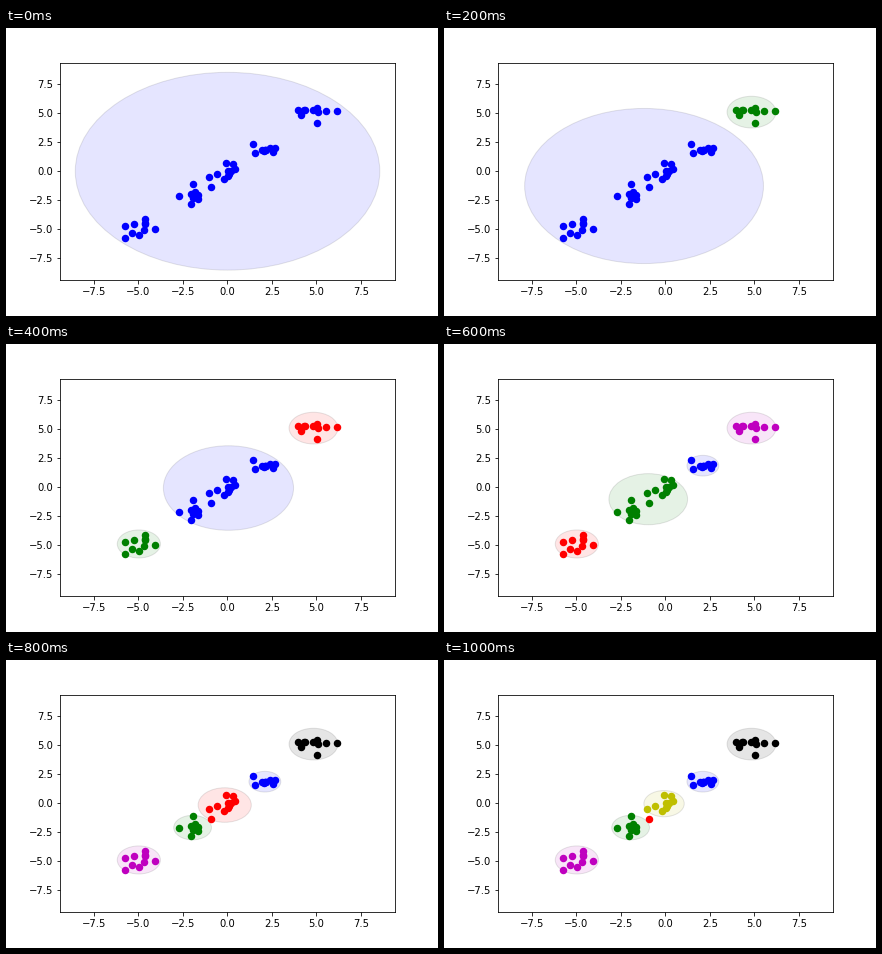
A matplotlib script for the animation above (1200 ms loop, 432 by 288 pixels).

```python
import matplotlib.pyplot as plt
import numpy as np
from matplotlib.animation import FuncAnimation
from matplotlib.patches import Circle

plt.rcParams.update({"font.family": "DejaVu Sans", "font.size": 10})
rng = np.random.default_rng(1)


def make_group(size, center, *rim):
    """Random points around a center, held between a few outermost points."""
    center, rim = np.array(center), np.array(rim)
    count = size - len(rim)
    noise = rng.normal(size=(count, 2)) * (1, 0.7)
    noise -= noise.mean(axis=0)
    reach = 0.75 * np.hypot(*(rim[0] - center))
    noise *= reach / np.hypot(*noise.T).max()
    # Place the inner points so that the whole group averages to its center.
    inner_center = (size * center - rim.sum(axis=0)) / count
    return np.vstack([rim, inner_center + noise])


GROUPS = {
    "A": make_group(10, (4.83, 5.11), (6.13, 5.23), (3.97, 5.26)),
    "B": make_group(10, (2.10, 1.86), (1.41, 2.36), (2.65, 1.97)),
    "C": make_group(10, (-0.08, -0.04), (-1.06, -0.49), (0.30, 0.63)),
    "D": make_group(9, (-1.96, -2.11), (-1.96, -1.10), (-2.07, -2.83)),
    "E": make_group(10, (-4.98, -4.91), (-5.75, -5.77), (-4.63, -4.13)),
    "X": np.array([(-0.92, -1.36)]),
}

# Each step splits one cluster further: colour -> member groups.
STEPS = [
    {"b": "ABCDEX"},
    {"b": "BCDEX", "g": "A"},
    {"b": "BCDX", "g": "E", "r": "A"},
    {"b": "B", "g": "CDX", "r": "E", "m": "A"},
    {"b": "B", "g": "D", "r": "CX", "m": "E", "k": "A"},
    {"b": "B", "g": "D", "r": "X", "m": "E", "k": "A", "y": "C"},
]
SPAN = np.array([-9.404, 9.404])
X_MID, Y_MID = -0.005, -0.008
TICKS = np.arange(-7.5, 8, 2.5)

fig = plt.figure(figsize=(6, 4), dpi=72, facecolor="white")
ax = fig.add_axes([0.125, 0.125, 0.775, 0.755])


def draw_cluster(color, members):
    points = np.vstack([GROUPS[name] for name in members])
    center = points.mean(axis=0)
    radius = 1.05 * np.hypot(*(points - center).T).max()
    if len(points) > 1:
        ax.add_patch(Circle(center, radius, facecolor=color, edgecolor="k",
                            linewidth=1, alpha=0.1))
    ax.scatter(*points.T, color=color, s=36, linewidth=1.5, zorder=2)


def update(step):
    ax.clear()
    for color, members in STEPS[step].items():
        draw_cluster(color, members)
    ax.set(xlim=X_MID + SPAN, ylim=Y_MID + SPAN, xticks=TICKS, yticks=TICKS)
    return ax.get_children()


anim = FuncAnimation(fig, update, frames=len(STEPS), interval=200,
                     repeat=True, repeat_delay=0, blit=False)
plt.show()
```
